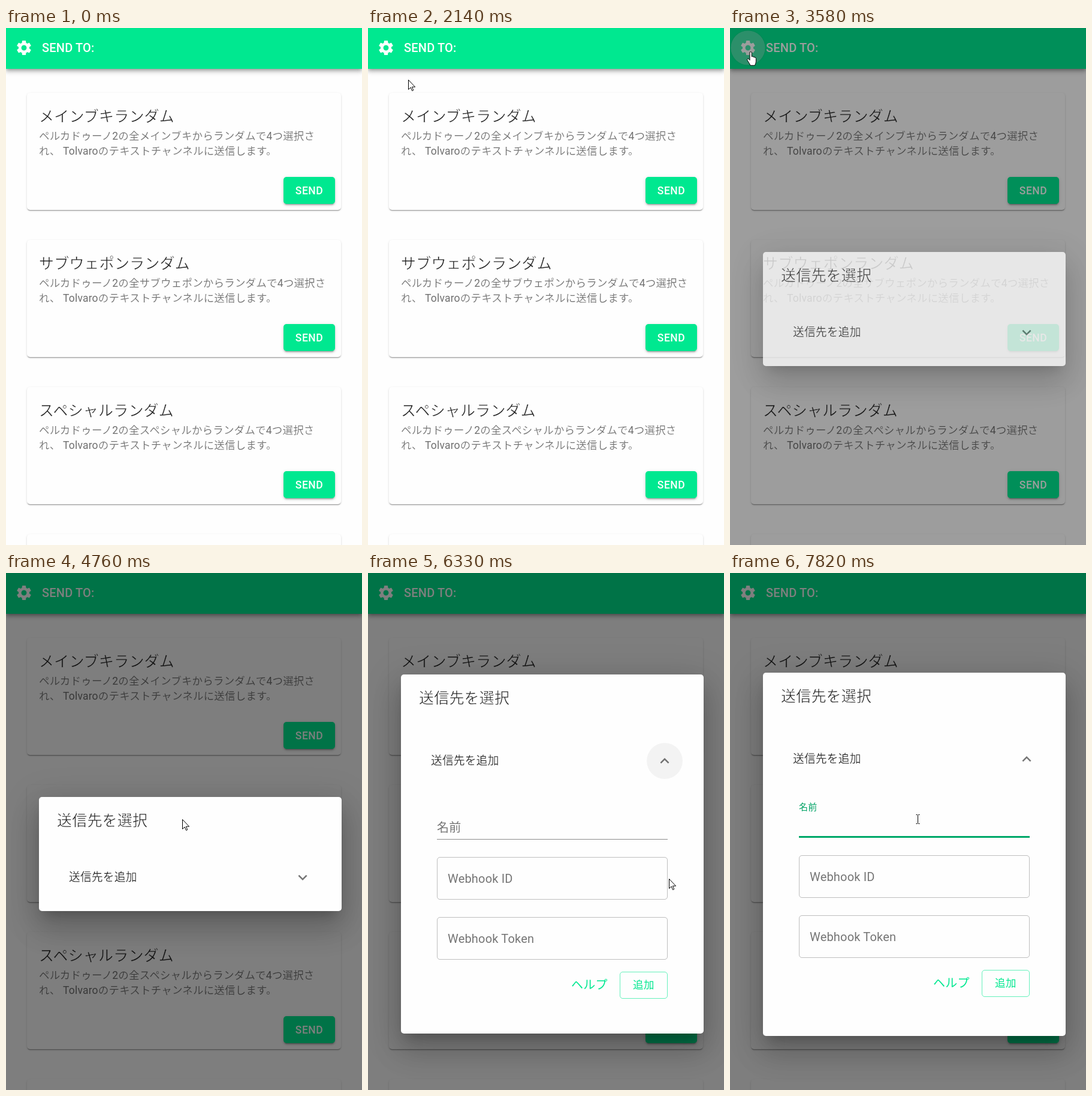
These frames come from a looping animation (594x861 px, 8000 ms). An HTML page:

```html
<!DOCTYPE html>
<html lang="ja">
<head>
<meta charset="utf-8">
<title>Send to</title>
<style>
  html, body { margin: 0; width: 100%; height: 100%; overflow: hidden; background: #fefefe; }
  #stage { --green: #00e890; position: relative; width: 594px; height: 861px; overflow: hidden; background: #fefefe;
    font: 300 17.5px/25px Roboto, "Noto Sans CJK JP", "Noto Sans CJK", sans-serif; color: rgba(0,0,0,.87); }
  #stage * { box-sizing: border-box; }
  #stage div, #stage svg { position: absolute; }
  #stage svg { overflow: visible; }
  b { font-weight: 400; -webkit-text-stroke: 0; }
  .header { left: 0; top: 0; width: 594px; height: 68px; background: var(--green); color: #fff;
    box-shadow: 0 2.5px 5px -1.25px rgba(0,0,0,.25), 0 5px 6.25px rgba(0,0,0,.19), 0 1.25px 12.5px rgba(0,0,0,.14); }
  .brand { left: 60px; top: 18px; font-weight: 500; font-size: 20px; line-height: 30px; letter-spacing: .19px; white-space: nowrap; }
  .card { left: 35px; width: 524px; height: 195px; padding: 20px; border-radius: 5px; background: #fefefe;
    box-shadow: 0 2.5px 1.25px -1.25px rgba(0,0,0,.2), 0 1.25px 1.25px rgba(0,0,0,.14), 0 1.25px 3.75px rgba(0,0,0,.12); }
  /* a paper-coloured stroke thins the strokes of the Japanese glyphs */
  .heading { font-size: 25px; line-height: 40px; letter-spacing: .19px; white-space: nowrap; -webkit-text-stroke: .6px #fefefe; }
  .card .heading { left: 20px; top: 20px; }
  .note { left: 20px; top: 60px; color: rgba(0,0,0,.56); letter-spacing: .19px; white-space: nowrap; -webkit-text-stroke: .2px #fefefe; }
  .send { left: 428px; top: 140px; width: 86px; height: 45px; border-radius: 5px; background: var(--green); color: #fff;
    font-weight: 500; line-height: 46px; letter-spacing: .5px; text-align: center;
    box-shadow: 0 3.75px 1.25px -2.5px rgba(0,0,0,.2), 0 2.5px 2.5px rgba(0,0,0,.14), 0 1.25px 6.25px rgba(0,0,0,.12); }
  .disc { width: 60px; height: 60px; border-radius: 50%; }
  #backdrop { inset: 0; background: rgba(0,0,0,.5); }
  #dialog { left: 55px; width: 505px; border-radius: 5px; background: #fefefe;
    box-shadow: 0 13.75px 18.75px -8.75px rgba(0,0,0,.2), 0 30px 47.5px 3.75px rgba(0,0,0,.14), 0 11.25px 57.5px 10px rgba(0,0,0,.12); }
  #dialog .heading { left: 30px; top: 20px; }
  #row { left: 0; top: 104px; width: 505px; height: 60px; }
  .summary { left: 50px; top: 15px; font-size: 18.75px; line-height: 30px; letter-spacing: .176px; white-space: nowrap; -webkit-text-stroke: .25px #fefefe; }
  #details { left: 0; top: 0; width: 505px; overflow: hidden; }
  #form { left: 0; top: 0; width: 505px; height: 579px; }
  #name { left: 60px; top: 245px; font-size: 20px; line-height: 20px; letter-spacing: .19px; transform-origin: 0 0; white-space: nowrap; }
  .line { left: 60px; width: 385px; }
  .field { left: 60px; width: 385px; height: 71px; padding-left: 17px; border: 1px solid; border-radius: 5px;
    font-weight: 400; font-size: 20px; line-height: 70px; letter-spacing: .19px; color: rgba(0,0,0,.54); }
  .help { left: 284px; top: 502px; font-weight: 400; font-size: 20px; line-height: 30px; letter-spacing: .19px; color: var(--green); white-space: nowrap; }
  .add { left: 365px; top: 495px; width: 80px; height: 45px; border: 1px solid rgba(0,232,144,.6); border-radius: 5px;
    font-weight: 400; line-height: 43px; letter-spacing: .5px; text-align: center; color: var(--green); }
  #caret { left: 60px; top: 242px; width: 1px; height: 24px; background: rgba(0,0,0,.87); }
  #cursor path { stroke: #000; stroke-width: 1; stroke-linejoin: round; fill: #fff; }
</style>
</head>
<body>
<div id="stage">
  <div id="page">
    <div class="header">
      <div id="gearHover" class="disc" style="left:0;top:3px;background:rgba(0,0,0,.04)"></div>
      <div id="gearRipple" class="disc" style="left:0;top:3px;background:#fff"></div>
      <svg id="gear" width="30" height="30" viewBox="-12 -12 24 24" style="left:15px;top:18px"></svg>
      <div class="brand">SEND TO:</div>
    </div>
  </div>
  <div id="backdrop"></div>
  <div id="dialog">
    <div class="heading">送信先を選択</div>
    <div id="details">
      <div id="form">
        <div id="name">名前</div>
        <div id="underline" class="line" style="top:274px;height:1px"></div>
        <div id="focusLine" class="line" style="top:272px;height:3px;background:#00a869"></div>
        <div id="caret"></div>
        <div id="hookId" class="field" style="top:304px">Webhook ID</div>
        <div class="field" style="top:404px;border-color:rgba(0,0,0,.25)">Webhook Token</div>
        <div class="help">ヘルプ</div>
        <div class="add">追加</div>
      </div>
    </div>
    <div id="row">
      <div class="summary">送信先を追加</div>
      <div id="rowRipple" class="disc" style="left:410px;top:0;background:#000"></div>
      <svg id="chevron" width="30" height="30" viewBox="0 0 24 24" style="left:425px;top:15px">
        <path d="M16.59 8.59L12 13.17 7.41 8.59 6 10l6 6 6-6z" fill="rgba(0,0,0,.54)"/>
      </svg>
    </div>
  </div>
  <svg id="cursor" width="20" height="26"><path/></svg>
</div>
<script>
const LOOP = 8000;
const $ = id => document.getElementById(id);
const clamp = v => Math.min(1, Math.max(0, v));

// CSS-style cubic bezier, solved by bisection
const bezier = (x1, y1, x2, y2) => x => {
  if (x <= 0 || x >= 1) return clamp(x);
  const at = (a, b, s) => 3 * (1 - s) ** 2 * s * a + 3 * (1 - s) * s * s * b + s ** 3;
  let lo = 0, hi = 1;
  for (let i = 0; i < 24; i++) {
    const mid = (lo + hi) / 2;
    if (at(x1, x2, mid) < x) lo = mid; else hi = mid;
  }
  return at(y1, y2, lo);
};
const standard = bezier(.4, 0, .2, 1);
const decelerate = bezier(0, 0, .2, 1);
const phase = (t, start, length, ease = standard) => ease(clamp((t - start) / length));

const latin = s => s.replace(/[A-Za-z0-9]+/g, '<b>$&</b>');
['メインブキ', 'サブウェポン', 'スペシャル', ''].forEach((kind, i) => {
  const body = kind && `<div class="heading">${kind}ランダム</div>
    <div class="note">${latin(`ペルカドゥーノ2の全${kind}からランダムで4つ選択さ`)}<br>${latin('れ、 Tolvaroのテキストチャンネルに送信します。')}</div>
    <div class="send">SEND</div>`;
  $('page').insertAdjacentHTML('beforeend', `<div class="card" style="top:${108 + 245 * i}px">${body}</div>`);
});

const teeth = Array.from({ length: 6 }, (_, i) =>
  `<path d="M-2.8 -6.5L-2.4 -9.2Q-2.3 -9.6 -1.9 -9.6H1.9Q2.3 -9.6 2.4 -9.2L2.8 -6.5Z" transform="rotate(${60 * i})"/>`).join('');
$('gear').innerHTML = `<g fill="#fff">${teeth}</g><circle r="5.4" fill="none" stroke="#fff" stroke-width="3.7"/>`;

const shapes = {
  arrow: [0, 0, 'M.5 .5V16.4L4.2 13 6.6 18.6 8.8 17.6 6.4 12.2H11.6Z'],
  hand: [-5, 0, 'M5 14V2.2a1.6 1.6 0 0 1 3.2 0V8.6Q9.8 7.6 10.8 9.2 12.2 8.4 13 10 15.2 9.6 15.4 11.6V17Q15.2 20 13.5 23.3H6Q4.5 20 1 14.8 0 12.6 1.8 12 3 11.8 5 14.6Z'],
  text: [-3, -8, 'M.5 .5H2.5L3.5 1.5 4.5 .5H6.5M3.5 1.5V14.5M.5 15.5H2.5L3.5 14.5 4.5 15.5H6.5']
};

const track = [
  [730, 456, 850], [1400, 237, 312], [1710, 237, 312], [2140, 67, 86], [2300, 23, 34],
  [2490, 33, 46], [2550, 33, 46], [2640, 33, 39], [4040, 33, 39], [4480, 274, 392],
  [4750, 274, 392], [4760, 294, 410], [5260, 473, 517], [5460, 473, 517], [5580, 502, 509],
  [6630, 502, 509], [7110, 313, 410], [LOOP, 313, 410]
];

// Hermite path that comes to rest wherever the pointer pauses
function slope(i, k) {
  const a = track[i - 1], b = track[i], c = track[i + 1];
  if (!a || !c || a[k] === b[k] || b[k] === c[k]) return 0;
  return (c[k] - a[k]) / (c[0] - a[0]);
}
function pointer(t) {
  const i = Math.max(0, track.findIndex(p => p[0] > t) - 1);
  const a = track[i], b = track[i + 1], d = b[0] - a[0], u = clamp((t - a[0]) / d);
  return [1, 2].map(k =>
    (1 + 2 * u) * (1 - u) ** 2 * a[k] + u * u * (3 - 2 * u) * b[k] +
    d * (u * (1 - u) ** 2 * slope(i, k) - u * u * (1 - u) * slope(i + 1, k)));
}

function ripple(el, t, start, grow, exit, fade, tint) {
  const p = phase(t, start, grow), out = 1 - phase(t, exit, fade);
  el.style.transform = `scale(${p})`;
  el.style.opacity = t < start ? 0 : tint * (.1 + .2 * p) * out;
}

function render(t) {
  const shown = phase(t, 3470, 225);
  $('backdrop').style.opacity = $('dialog').style.opacity = shown;

  ripple($('gearRipple'), t, 3265, 430, 3550, 260, 1);
  $('gearHover').style.opacity = t < 3265 ? 0 : 1 - phase(t, 3550, 260);
  ripple($('rowRipple'), t, 5805, 550, 6140, 400, .54);

  const turn = phase(t, 6140, 130), open = phase(t, 6140, 230);
  const height = Math.round(190 + 20 * turn + 395 * open);
  $('dialog').style.top = Math.round(468.3 - height / 2) + 'px';
  $('dialog').style.height = height + 'px';
  $('details').style.height = height - 26 + 'px';
  $('form').style.transform = `translateY(${20 * (turn - 1)}px)`;
  $('row').style.transform = `translateY(${10 * turn}px)`;
  $('chevron').style.transform = `rotate(${180 * turn}deg)`;

  const [x, y] = pointer(t), expanded = open === 1;
  const inside = (y0, y1) => expanded && x > 115 && x < 500 && y > y0 && y < y1;
  const onName = inside(395, 440), onId = inside(470, 541);
  const onGear = t < 4050 && Math.hypot(x - 30, y - 33) < 30;

  const focus = phase(t, 7290, 200, decelerate), focused = t >= 7290;
  $('name').style.transform = `translateY(${-28.5 * focus}px) scale(${1 - .25 * focus})`;
  $('name').style.color = focused ? '#00a366' : 'rgba(0,0,0,.54)';
  $('focusLine').style.transform = `scaleX(${focus})`;
  $('underline').style.background = onName ? 'rgba(0,0,0,.87)' : 'rgba(0,0,0,.45)';
  $('underline').style.visibility = focus === 1 ? 'hidden' : 'visible';
  $('hookId').style.borderColor = `rgba(0,0,0,${onId ? .87 : .25})`;
  $('caret').style.opacity = focused && t < 7820 ? 1 : 0;

  const kind = onGear ? 'hand' : onName || onId ? 'text' : 'arrow';
  const [dx, dy, path] = shapes[kind], cursor = $('cursor');
  cursor.style.visibility = t < 730 ? 'hidden' : 'visible';
  cursor.style.transform = `translate(${Math.round(x) + dx}px, ${Math.round(y) + dy}px)`;
  cursor.firstElementChild.setAttribute('d', path);
  cursor.firstElementChild.style.fill = kind === 'text' ? 'none' : '#fff';
}

const began = performance.now();
function tick() {
  render((performance.now() - began) % LOOP);
  requestAnimationFrame(tick);
}
tick();
</script>
</body>
</html>
```
